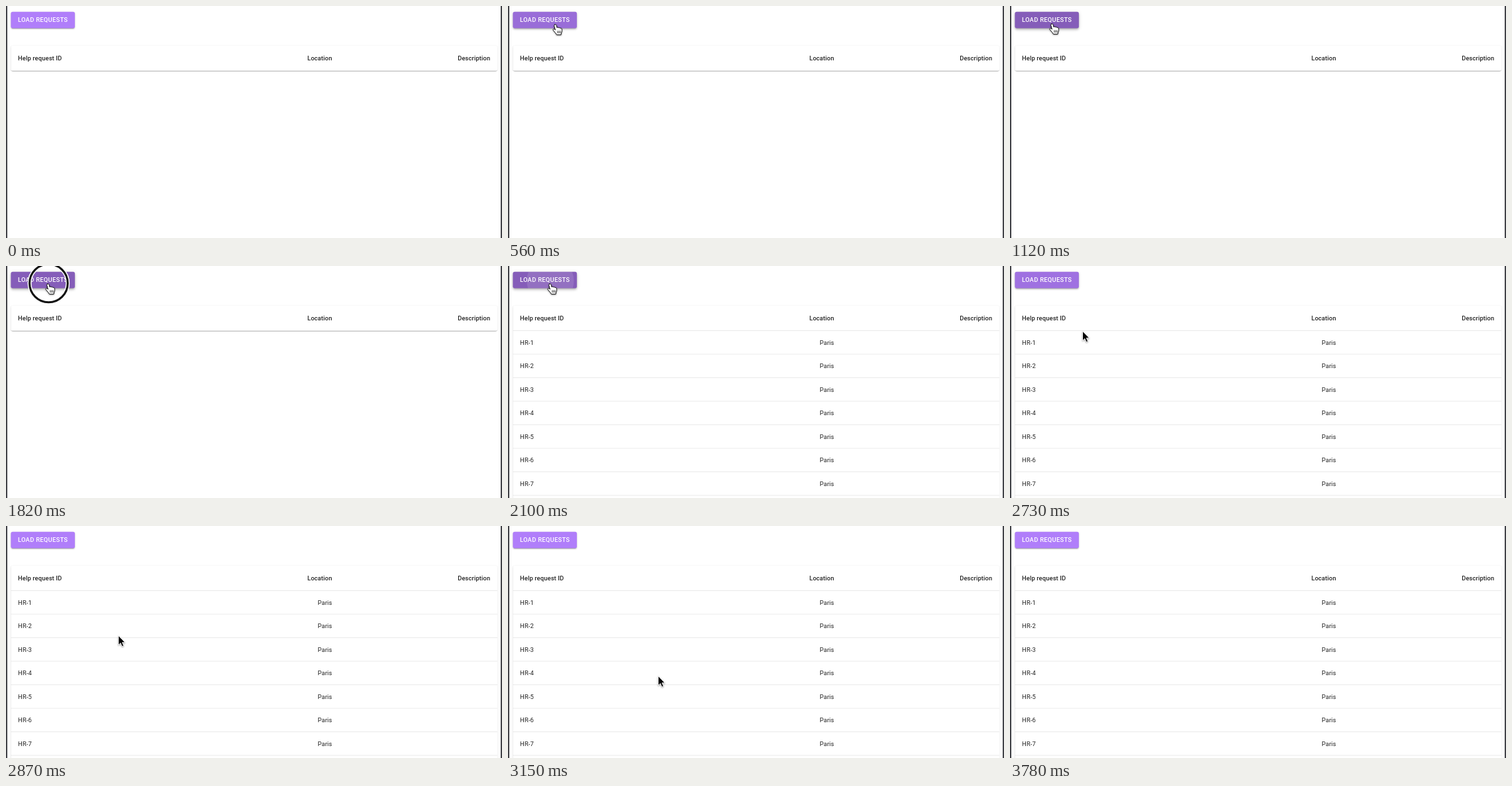
Animation of 748x350 px, one loop 4130 ms. Source, as an HTML page:

```html
<!DOCTYPE html>
<html lang="en">
<head>
<meta charset="utf-8">
<title>Help requests</title>
<style>
  html, body { margin: 0; width: 100%; height: 100%; overflow: hidden; background: #fff; }
  #stage { position: absolute; left: 0; top: 0; width: 748px; height: 350px; overflow: hidden; }
  #page {
    position: absolute; left: 0; top: 0; width: 1117px; height: 523px;
    transform: scale(.67); transform-origin: 0 0;
    font: 400 14px/20px Roboto, Arial, sans-serif; letter-spacing: .01071em;
    color: rgba(0, 0, 0, .87);
  }
  #load {
    position: absolute; left: 11px; top: 13px; width: 144px; height: 36.5px;
    border-radius: 4px; color: #fff; text-align: center; white-space: nowrap;
    font-weight: 500; line-height: 36.5px; letter-spacing: .02857em;
  }
  #load span { position: relative; }
  #clip { position: absolute; inset: 0; overflow: hidden; border-radius: 4px; }
  #ripple {
    position: absolute; left: 84px; top: 20px; width: 0; height: 0;
    border-radius: 50%; background: #fff; transform: translate(-50%, -50%);
  }
  #paper {
    position: absolute; left: 11px; top: 89px; width: 1095px; border-radius: 4px; background: #fff;
    box-shadow: 0 2px 1px -1px rgba(0,0,0,.2), 0 1px 1px rgba(0,0,0,.14), 0 1px 3px rgba(0,0,0,.12);
  }
  .row { position: relative; height: 52px; line-height: 52px; border-bottom: 1px solid #e0e0e0; }
  .head { height: 56px; line-height: 56px; font-weight: 500; }
  .row span { position: absolute; top: 0; }
  .row span:nth-child(1) { left: 16px; }
  .row span:nth-child(2) { right: 372px; }
  .row span:nth-child(3) { right: 16px; }
  .bar { position: absolute; top: 0; width: 2px; height: 350px; background: #424348; }
  svg { position: absolute; left: 0; top: 0; }
  .cursor { filter: drop-shadow(0 1px 1px rgba(0, 0, 0, .4)); }
</style>
</head>
<body>
<div id="stage">
  <div id="page">
    <div id="load"><div id="clip"><div id="ripple"></div></div><span>LOAD REQUESTS</span></div>
    <div id="paper">
      <div class="row head"><span>Help request ID</span><span>Location</span><span>Description</span></div>
      <div id="rows"></div>
    </div>
  </div>
  <div class="bar" style="left:0"></div>
  <div class="bar" style="right:0"></div>
  <svg width="748" height="350" fill="none">
    <g id="ring">
      <circle cx="64.3" cy="26" r="28.8" stroke="#fff" stroke-width="6"/>
      <circle cx="64.3" cy="26" r="28.8" stroke="#111" stroke-width="3"/>
    </g>
    <g id="hand" class="cursor" stroke="#111" stroke-linejoin="round" stroke-linecap="round">
      <path fill="#fff" d="M3.4 1.2C4.6.4 5.8 1 6.1 2.4L6.8 5.6C7.6 4.9 8.9 5.1 9.3 6C10.2 5.3 11.4 5.7 11.8 6.6C12.8 6.1 14 6.6 14.2 7.8C14.6 9.8 14.4 11.6 13.6 13.2L13 16.4H6.4C5.6 14.6 3.6 12.6 2 10.6C.8 9.2.6 8.2 1.6 7.8C2.6 7.4 3.4 8 4.4 9.2L2.7 3.2C2.5 2.2 2.8 1.5 3.4 1.2Z"/>
      <path stroke-width=".8" d="M7.8 10.8v3M9.8 10.8v3M11.8 10.8v3"/>
    </g>
    <g id="arrow" class="cursor">
      <path fill="#000" stroke="#fff" stroke-width=".9" d="M.5.3V14.6L3.8 11.6L6 16.7L8.5 15.6L6.3 10.7H10.6Z"/>
    </g>
  </svg>
</div>
<script>
const LOOP = 4130, STEP = 70;
const $ = id => document.getElementById(id);
const [load, ripple, rows, ring, hand, arrow] =
  ['load', 'ripple', 'rows', 'ring', 'hand', 'arrow'].map($);

for (let i = 1; i <= 8; i++) {
  rows.insertAdjacentHTML('beforeend',
    `<div class="row"><span>HR-${i}</span><span>Paris</span></div>`);
}

// time, pointer shape, x, y
const moves = [
  [0, null], [420, arrow, 110, 26], [490, hand, 83, 28], [560, hand, 67, 27],
  [630, hand, 61, 26], [700, hand, 59, 26],
  [2590, hand, 62, 28], [2660, arrow, 84, 63], [2730, arrow, 109, 98],
  [2800, arrow, 140, 132], [2870, arrow, 169, 165], [2940, arrow, 192, 191],
  [3010, arrow, 209, 211], [3080, arrow, 220, 223], [3150, arrow, 226, 226],
  [3640, arrow, 239, 241], [3710, arrow, 261, 268], [3780, null]
];

const ease = 'cubic-bezier(.4, 0, .2, 1)';
const idle = {
  backgroundColor: '#b07efa',
  boxShadow: '0 3px 1px -2px rgba(0,0,0,.2), 0 2px 2px 0 rgba(0,0,0,.14), 0 1px 5px 0 rgba(0,0,0,.12)'
};
const hover = {
  backgroundColor: '#855db9',
  boxShadow: '0 2px 4px -1px rgba(0,0,0,.2), 0 4px 5px 0 rgba(0,0,0,.14), 0 1px 10px 0 rgba(0,0,0,.12)'
};
const key = (t, look) => ({ ...look, offset: t / LOOP, easing: ease });

function track(el, keys) {
  const a = el.animate(keys, { duration: LOOP, fill: 'both' });
  a.pause();
  return a;
}
const tracks = [
  track(load, [key(0, idle), key(470, idle), key(720, hover),
    key(2630, hover), key(2880, idle), key(LOOP, idle)]),
  track(ripple, [
    key(0, { width: '0px', height: '0px' }), key(1880, { width: '0px', height: '0px' }),
    key(2430, { width: '172px', height: '172px' }), key(LOOP, { width: '172px', height: '172px' })
  ])
];

const show = (el, on) => { el.style.visibility = on ? 'visible' : 'hidden'; };

function render(time) {
  const t = Math.floor((time % LOOP) / STEP) * STEP;
  tracks.forEach(a => { a.currentTime = t; });
  ripple.style.opacity = Math.max(0, Math.min(.25, (2240 - t) / 1200));
  rows.style.display = t >= 2030 ? 'block' : 'none';
  show(ring, t >= 1820 && t < 1960);

  const [, shape, x, y] = moves.filter(m => m[0] <= t).pop();
  show(hand, shape === hand);
  show(arrow, shape === arrow);
  if (shape) shape.setAttribute('transform', `translate(${x} ${y})`);
}

const start = performance.now();
function tick() {
  render(performance.now() - start);
  requestAnimationFrame(tick);
}
tick();
</script>
</body>
</html>
```
